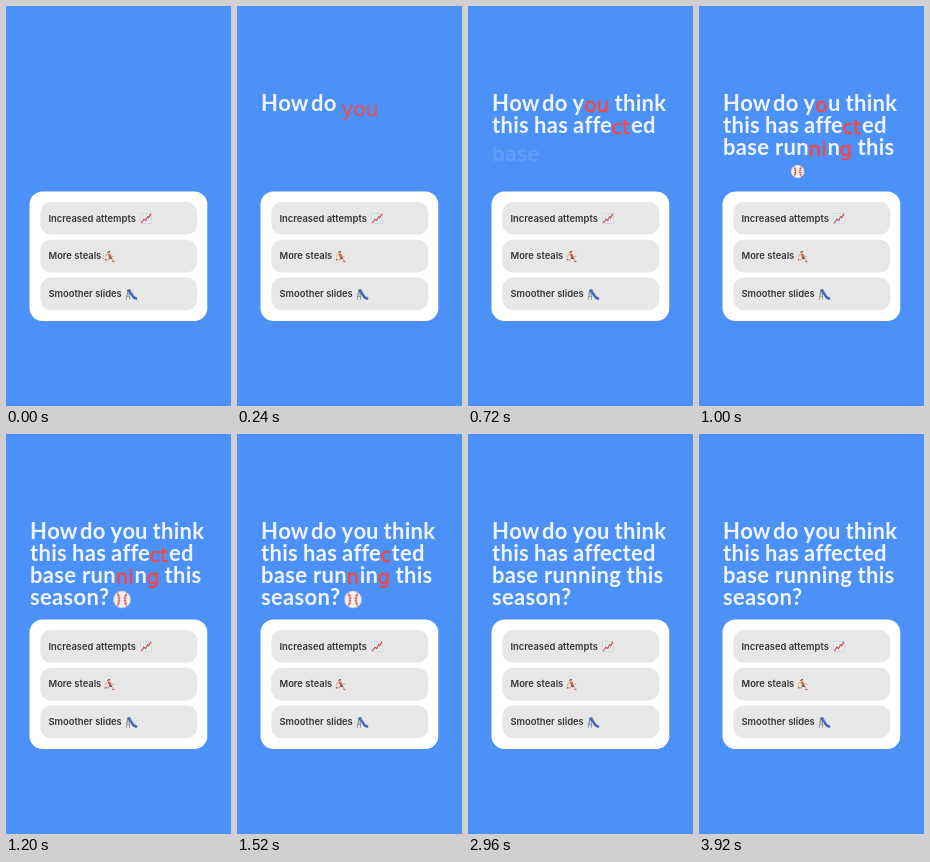
Animation, 225 px wide and 400 px high, one loop 3.96 s. Source, as an HTML page:

```html
<!DOCTYPE html>
<html lang="en">
<head>
<meta charset="utf-8">
<title>Question card</title>
<style>
  html, body { margin: 0; width: 100%; height: 100%; overflow: hidden; background: #4b91f7; }
  svg { display: block; width: 225px; height: 400px; }
  .title { font: 700 22px Lato, sans-serif; fill: #f0f4fd; }
  .entry { font: 400 20px "DejaVu Sans", sans-serif; stroke-width: .5px; }
  .option { font: 600 9.4px Inter, sans-serif; fill: #343436; }
</style>
</head>
<body>
<svg viewBox="0 0 225 400">
  <rect width="225" height="400" fill="#4b91f7"/>
  <rect x="23.5" y="185.5" width="177.8" height="129.5" rx="13" fill="#fff"/>
  <g fill="#e7e7e7">
    <rect x="34.3" y="196" width="157" height="32.6" rx="11"/>
    <rect x="34.3" y="233.8" width="157" height="32.6" rx="11"/>
    <rect x="34.3" y="271.6" width="157" height="32.6" rx="11"/>
  </g>
  <g class="option">
    <text x="42.5" y="215.6">Increased attempts</text>
    <text x="42.5" y="253.4">More steals</text>
    <text x="42.5" y="291.2">Smoother slides</text>
  </g>

  <!-- chart -->
  <g transform="translate(134.5 207)" fill="none">
    <rect x=".3" y=".3" width="10.4" height="10.4" fill="#f5f7f9" stroke="#bccbd2" stroke-width=".6"/>
    <path d="M3 .5V10.5M5.6 .5V10.5M8.2 .5V10.5M.5 3H10.5M.5 5.6H10.5M.5 8.2H10.5" stroke="#b5d0da" stroke-width=".5"/>
    <path d="M.8 10L3.4 6.2 5.2 7.4 7.2 3.6 8.2 4.6 10.4 .9" stroke="#d9423f" stroke-width="1.1"/>
  </g>

  <!-- runner -->
  <g transform="translate(98.5 245)" fill="none" stroke-linecap="round" stroke-linejoin="round">
    <path d="M4.6 3.4L2 3.6 1 5.6M5.6 3.6L7.4 5.8 9.4 5" stroke="#e2ae8b" stroke-width="1.1"/>
    <path d="M6.2 7L8 8.4 8.5 10.2M4.8 7.5L3.6 9 1.4 8.6" stroke="#d9a27f" stroke-width="1.2"/>
    <path d="M4.8 3.8L5.7 6.5" stroke="#d95945" stroke-width="2.3"/>
    <path d="M5.3 7L6.7 7.3" stroke="#4b5d78" stroke-width="1.6"/>
    <path d="M8.3 10.6H9.6M.9 8.1V9.2" stroke="#b34739" stroke-width=".9"/>
    <circle cx="4.3" cy="1.6" r="1.4" fill="#e2ae8b"/>
    <path d="M3 1.5Q3.5 0 5.2 .5" stroke="#58443c" stroke-width=".9"/>
  </g>

  <!-- slide -->
  <g transform="translate(119.5 282.5)" fill="none" stroke-linecap="round">
    <path d="M2.3 1.2L.8 10.8M4.6 1.2L4 10.8M2 3.4H4.4M1.7 5.6H4.2M1.4 7.8H4" stroke="#77858f" stroke-width=".8"/>
    <path d="M3.5 2.8C6.6 3.4 6.3 9.8 10.6 10" stroke="#365bb5" stroke-width="2.5"/>
    <path d="M4.3 2.6C7.2 3.4 7 8.5 10.8 9" stroke="#85a5e5" stroke-width=".8"/>
    <path d="M2.2 2.2Q3.5 -.7 5 2" stroke="#526681" stroke-width=".9"/>
  </g>

  <g id="title"></g>

  <g id="ball">
    <circle r="10" fill="#f5f3f1" stroke="#cbc8ca" stroke-width=".7"/>
    <g fill="none" stroke="#d44742">
      <path d="M-5.7 -8Q-.7 0 -5.7 8M5.7 -8Q.7 0 5.7 8" stroke-width="1.2"/>
      <path d="M-6.2 -4.2L-2.5 -5M-5.5 -1.4L-1.7 -1.8M-5.5 1.4L-1.7 1.8M-6.2 4.2L-2.5 5M6.2 -4.2L2.5 -5M5.5 -1.4L1.7 -1.8M5.5 1.4L1.7 1.8M6.2 4.2L2.5 5" stroke-width=".9"/>
    </g>
  </g>
</svg>

<script>
const LOOP = 3960;
const PALE = '#e8f0ff', RED = '#fb4540';
const title = document.getElementById('title');
const pen = document.createElement('canvas').getContext('2d');

// text, x, baseline, entrance time, {letter index: time it settles}
const words = [
  ['How', 24, 105, 10],
  ['do', 74, 105, 80],
  ['you', 104.5, 105, 170, {0: 360, 1: 1100, 2: 860}],
  ['think', 146.5, 105, 280],
  ['this', 24, 127, 380],
  ['has', 66, 127, 465],
  ['affected', 105, 127, 560, {4: 1800, 5: 1280}],
  ['base', 24, 149, 700],
  ['running', 76, 149, 765, {3: 1780, 4: 1240, 6: 1860}],
  ['this', 158.5, 149, 850],
  ['season?', 24, 171, 1010]
];

function animate(el, steps) {
  const frames = steps.map(([ms, props]) => ({offset: ms / LOOP, ...props}));
  el.animate(frames, {duration: LOOP, iterations: Infinity});
}

function glyph(char, x, y, cls) {
  const el = document.createElementNS('http://www.w3.org/2000/svg', 'text');
  el.setAttribute('class', cls);
  el.setAttribute('x', x);
  el.setAttribute('y', y);
  el.textContent = char;
  return title.appendChild(el);
}

function width(text, font) {
  pen.font = font;
  return pen.measureText(text).width;
}

function pose(opacity, color, dy) {
  return {opacity, fill: color, stroke: color, transform: `translateY(${dy}px)`};
}

for (const [text, x, y, start, settle = {}] of words) {
  [...text].forEach((char, i) => {
    const before = text.slice(0, i);
    const end = settle[i] || start + 135;
    const entry = glyph(char, x + width(before, '400 20px "DejaVu Sans", sans-serif'), y, 'entry');
    const final = glyph(char, x + width(before, '700 22px Lato, sans-serif') + i * .3, y, 'title');

    animate(entry, [
      [0, pose(0, PALE, 7)],
      [start, pose(0, PALE, 7)],
      [start + 25, pose(.16, PALE, 6)],
      [start + 70, pose(.78, RED, 5)],
      [start + 120, pose(1, RED, 1)],
      [end, pose(1, RED, 1)],
      [end, pose(0, RED, 1)],
      [LOOP, pose(0, RED, 1)]
    ]);
    animate(final, [
      [0, {opacity: 0}],
      [end, {opacity: 0}],
      [end, {opacity: 1}],
      [LOOP, {opacity: 1}]
    ]);
  });
}

// time, x, y, diameter
const bounce = [
  [0, 98, 165, 0], [920, 98, 165, 0], [1000, 98.5, 165.5, 13],
  [1100, 115, 168, 19], [1200, 116, 165.5, 17], [1700, 116, 165.5, 17],
  [2000, 116, 165.3, 14.2], [2300, 116, 165.3, 14.2],
  [2740, 116, 165.3, 0], [LOOP, 116, 165.3, 0]
];
animate(document.getElementById('ball'), bounce.map(([ms, x, y, size]) =>
  [ms, {transform: `translate(${x}px, ${y}px) scale(${size / 20})`}]));
</script>
</body>
</html>
```
